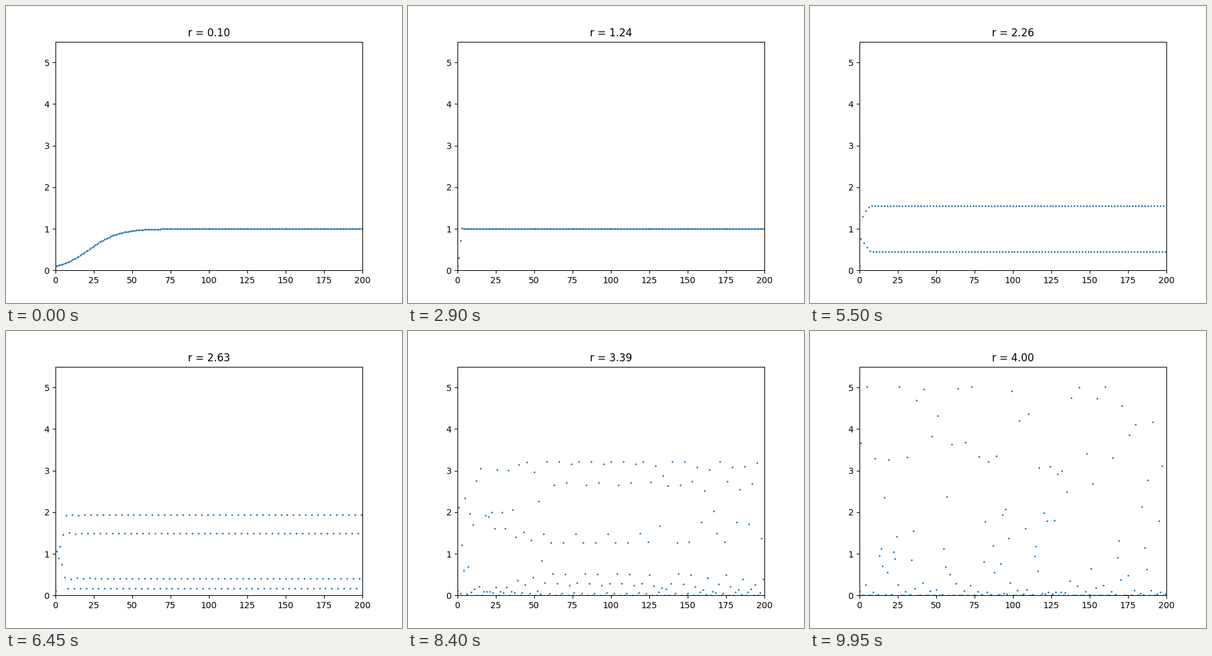
A matplotlib script for the animation above (10000 ms loop, 640 by 480 pixels).

```python
import numpy as np
import matplotlib.pyplot as plt
from matplotlib.animation import FuncAnimation

STEPS = 200
FRAMES = 200
rates = np.linspace(0.1, 4.0, FRAMES)


def ricker(r, x=0.1):
    """Population sequence of the Ricker map for growth rate r."""
    xs = np.empty(STEPS)
    for n in range(STEPS):
        xs[n] = x
        x = x * np.exp(r * (1 - x))
    return xs


fig, ax = plt.subplots(figsize=(6.4, 4.8), dpi=100)
ax.set_xlim(0, 200)
ax.set_ylim(0, 5.5)
dots, = ax.plot([], [], "o", markersize=1, color="#1f77b4")
title = ax.set_title("")


def update(i):
    dots.set_data(np.arange(STEPS), ricker(rates[i]))
    title.set_text(f"r = {rates[i]:.2f}")
    return dots, title


anim = FuncAnimation(fig, update, frames=FRAMES, interval=50,
                     repeat=True, repeat_delay=0)
plt.show()
```
